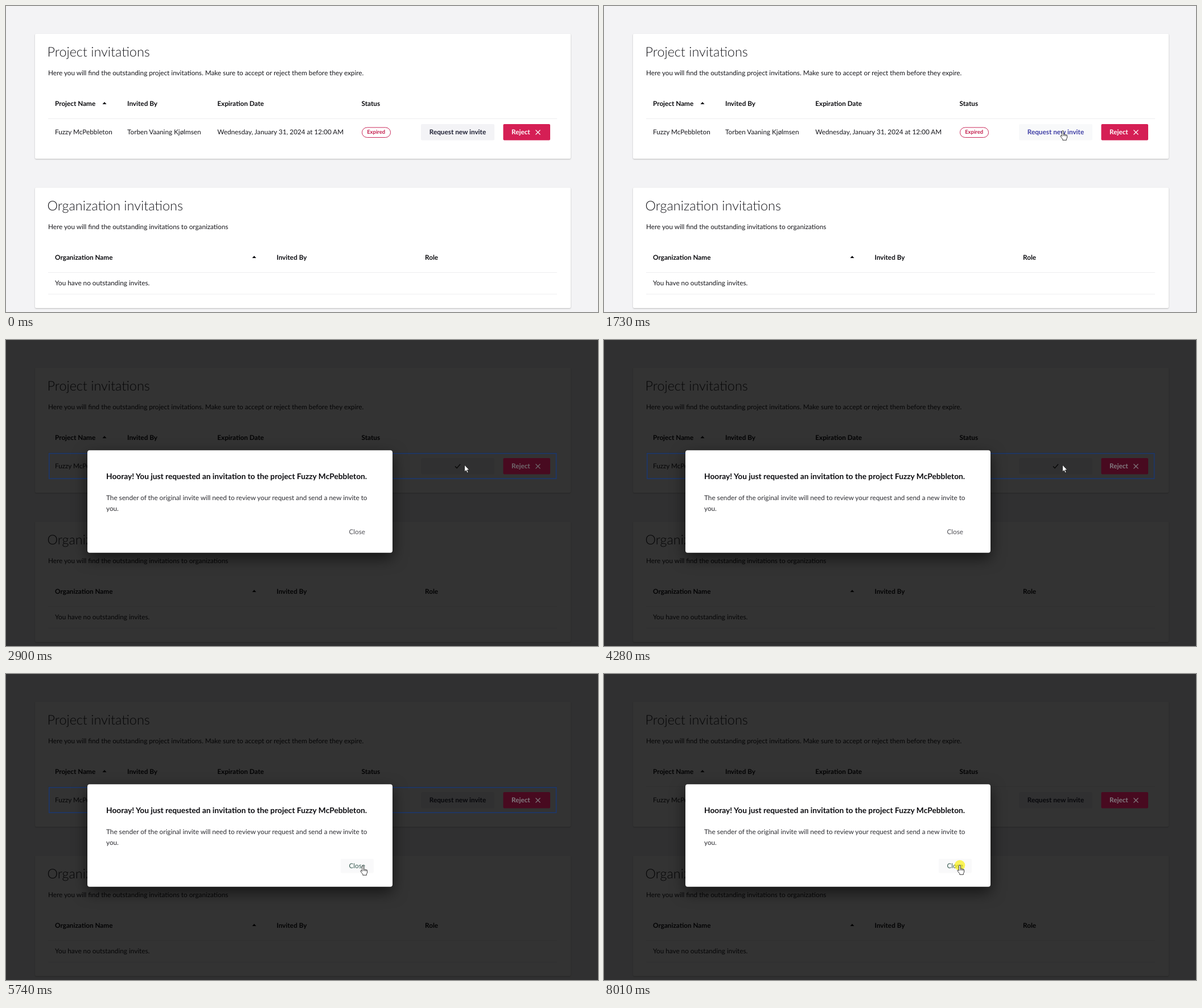
An HTML page that plays this animation: 1040 px wide and 539 px high, repeating every 8070 ms.

```html
<!DOCTYPE html>
<html lang="en">
<head>
<meta charset="utf-8">
<title>Invitations</title>
<style>
  html, body { margin: 0; width: 100%; height: 100%; overflow: hidden; background: #f3f3f5; }
  svg { display: block; font: 11.74px Lato, "Open Sans", sans-serif; fill: #17171c; text-rendering: geometricPrecision; }
  .title { font-size: 23.4px; font-weight: 300; }
  .bold { font-weight: 700; fill: #0c0c10; }
  .mid { text-anchor: middle; }
  .card { fill: #fff; filter: drop-shadow(0 1px 1px rgba(0,0,0,.24)); }
  .rule { stroke: #eeeef0; }
  .line { fill: none; }
  #dialog > rect:first-child { filter: drop-shadow(0 9px 13px rgba(0,0,0,.6)); }
  #ring { fill: none; stroke: #3b7de8; stroke-width: 1.7; }
  #rejectBox { fill: #d51f55; }
  #rejectLabel { fill: #fff; stroke: #fff; }
  #rejectLabel text { fill: inherit; stroke: none; }
  .dim #ring { stroke: #1d376b; }
  .dim #rejectBox { fill: #480a20; }
  .dim #rejectLabel { fill: #706a6e; stroke: #706a6e; }
  .dim.ready #rejectLabel { fill: #827b80; stroke: #827b80; }
</style>
</head>
<body>
<svg id="stage" width="1040" height="539" viewBox="0 0 1040 539">
  <rect width="1040" height="539" fill="#f3f3f5"/>

  <rect class="card" x="51" y="49" width="941" height="220" rx="2"/>
  <text class="title" x="72.5" y="88.5">Project invitations</text>
  <text x="74" y="122">Here you will find the outstanding project invitations. Make sure to accept or reject them before they expire.</text>
  <g class="bold">
    <text x="86" y="176">Project Name</text>
    <path d="M169.5 173l3.5-4 3.5 4z"/>
    <text x="213" y="176">Invited By</text>
    <text x="371.3" y="176">Expiration Date</text>
    <text x="624.5" y="176">Status</text>
  </g>
  <path class="rule" d="M74 198.5H968"/>
  <text x="86" y="226">Fuzzy McPebbleton</text>
  <text x="213" y="226">Torben Vaaning Kjølmsen</text>
  <text x="371.3" y="226">Wednesday, January 31, 2024 at 12:00 AM</text>
  <rect x="625.5" y="214" width="50" height="17.5" rx="8.75" fill="none" stroke="#c9295a"/>
  <text class="bold mid" x="650.2" y="225.3" style="font-size:9.5px;fill:#c41f4e">Expired</text>

  <rect id="requestBox" x="729" y="208" width="129" height="28.5" rx="2"/>
  <text id="requestLabel" class="bold mid" x="793.5" y="226">Request new invite</text>
  <g id="spinner" class="line" stroke-width="2.6">
    <circle cx="793.5" cy="222.5" r="7" stroke="#a6a6d8"/>
    <path d="M793.5 215.5a7 7 0 0 1 6.1 10.5" stroke="#3f3fa6"/>
  </g>
  <path id="check" class="line" d="M789 222.5l3 3.2 6-7" stroke="#222" stroke-width="1.4"/>

  <rect class="card" x="51" y="320" width="941" height="212" rx="2"/>
  <text class="title" x="72.5" y="360">Organization invitations</text>
  <text x="74" y="393">Here you will find the outstanding invitations to organizations</text>
  <g class="bold">
    <text x="86" y="447">Organization Name</text>
    <path d="M432.5 444l3.5-4 3.5 4z"/>
    <text x="475.5" y="447">Invited By</text>
    <text x="736" y="447">Role</text>
  </g>
  <path class="rule" d="M74 469.5H968M74 507.5H968"/>
  <text x="86" y="492">You have no outstanding invites.</text>

  <rect id="shade" width="1040" height="539" fill="#000" opacity=".8"/>

  <rect id="ring" x="75.8" y="199.8" width="890.8" height="44.4"/>
  <rect id="rejectBox" x="873.5" y="208" width="82.5" height="28.5" rx="2"/>
  <g id="rejectLabel">
    <text class="bold" style="fill:inherit" x="888" y="226">Reject</text>
    <path d="M930.5 218.5l8 8m0-8l-8 8" stroke-width="1.1"/>
  </g>

  <g id="dialog">
    <rect x="143" y="194.3" width="536" height="180.4" rx="4" fill="#fff"/>
    <text class="bold" style="font-size:13.75px" x="176" y="245">Hooray! You just requested an invitation to the project Fuzzy McPebbleton.</text>
    <g fill="#2c2c31">
      <text x="176" y="282">The sender of the original invite will need to review your request and send a new invite to</text>
      <text x="176" y="300.5">you.</text>
    </g>
    <rect id="closeBox" x="588" y="325.5" width="58" height="25" rx="2" fill="#f9f9fa"/>
    <text id="closeLabel" class="mid" x="616.8" y="342">Close</text>
  </g>

  <g id="pointer">
    <circle id="click" r="9.3" fill="#fbf000" opacity=".65"/>
    <path id="arrow" d="M.5 0V12.2L3.3 9.6 5.2 14 7.2 13.2 5.3 8.9H9z" fill="#fff" stroke="#222" stroke-width=".9"/>
    <path id="hand" d="M-1.4 1.2Q-1.2-.4 0-.4T1.4 1.2V6.3Q2.6 5.3 3.6 6.6 4.9 5.8 5.8 7.1 7.5 6.5 7.7 8.4V11Q7.6 13 6.4 14.2V16.3H-.2V14.6L-3.6 10.4Q-4.8 8.7-3.5 8.2-2.5 8-1.4 9.6zM1.4 6.3V9M3.7 6.8V9.2M5.8 7.3V9.4" fill="#fff" stroke="#222" stroke-width=".9" stroke-linejoin="round"/>
  </g>
</svg>
<script>
const LOOP = 8070;
const PRESS = 2460, LOADING = 2600, OPEN = 2900, RESTING = 4220, RESET = 5030, CLOSE = 8010;

// Each move: start, end, number of steps, then start, control and end points.
const moves = [
  [980, 1730, 11, [1013, 300], [870, 345], [806, 220]],
  [2600, 2601, 1, [806, 220], [806, 220], [805, 220]],
  [4220, 5030, 12, [805, 220], [735, 262], [672, 307]],
  [5030, 5740, 10, [672, 307], [645, 326], [627, 338]],
  [6800, 6880, 1, [626, 338], [626, 338], [625, 337]]
];

const el = {};
document.querySelectorAll('[id]').forEach(node => el[node.id] = node);
const show = (id, on) => { el[id].style.display = on ? '' : 'none'; };

function pointerAt(t) {
  const move = moves.filter(m => m[0] <= t).pop();
  if (!move) return null;
  const [start, end, steps, a, b, c] = move;
  const p = Math.min(1, Math.floor((t - start) / (end - start) * steps + 0.05) / steps);
  const u = 1 - (1 - p) ** 1.8, v = 1 - u;
  return [0, 1].map(i => v * v * a[i] + 2 * u * v * b[i] + u * u * c[i]);
}

const inside = (p, x, y, w, h) =>
  !!p && p[0] >= x && p[0] <= x + w && p[1] >= y && p[1] <= y + h;

function render(t) {
  const pos = pointerAt(t);
  const open = t >= OPEN;
  const loading = t >= LOADING && !open;
  const overRequest = !open && inside(pos, 729, 208, 129, 28);
  const overClose = open && inside(pos, 588, 325, 58, 25);
  const hand = overClose || (overRequest && !loading);

  el.stage.classList.toggle('dim', open);
  el.stage.classList.toggle('ready', t >= RESTING);
  show('shade', open);
  show('dialog', open);
  show('ring', t >= PRESS && t < CLOSE);
  show('spinner', loading);
  show('check', open && t < RESET);
  show('requestLabel', t < LOADING || t >= RESET);
  show('closeBox', overClose);
  el.requestBox.style.fill = overRequest ? '#f8f9fa' : '#f3f3f6';
  el.requestLabel.style.fill = overRequest ? '#3f3fa6' : '#1d1f33';
  el.closeLabel.style.fill = overClose ? '#35594f' : '#505056';
  el.spinner.setAttribute('transform', `rotate(${(t - 2830) * 0.36} 793.5 222.5)`);

  show('pointer', pos);
  show('hand', hand);
  show('arrow', !hand);
  show('click', (t >= PRESS && t < LOADING) || t >= CLOSE);
  if (pos) el.pointer.setAttribute('transform', `translate(${pos.map(Math.round)})`);
}

function tick() {
  render(performance.now() % LOOP);
  requestAnimationFrame(tick);
}
tick();
</script>
</body>
</html>
```
